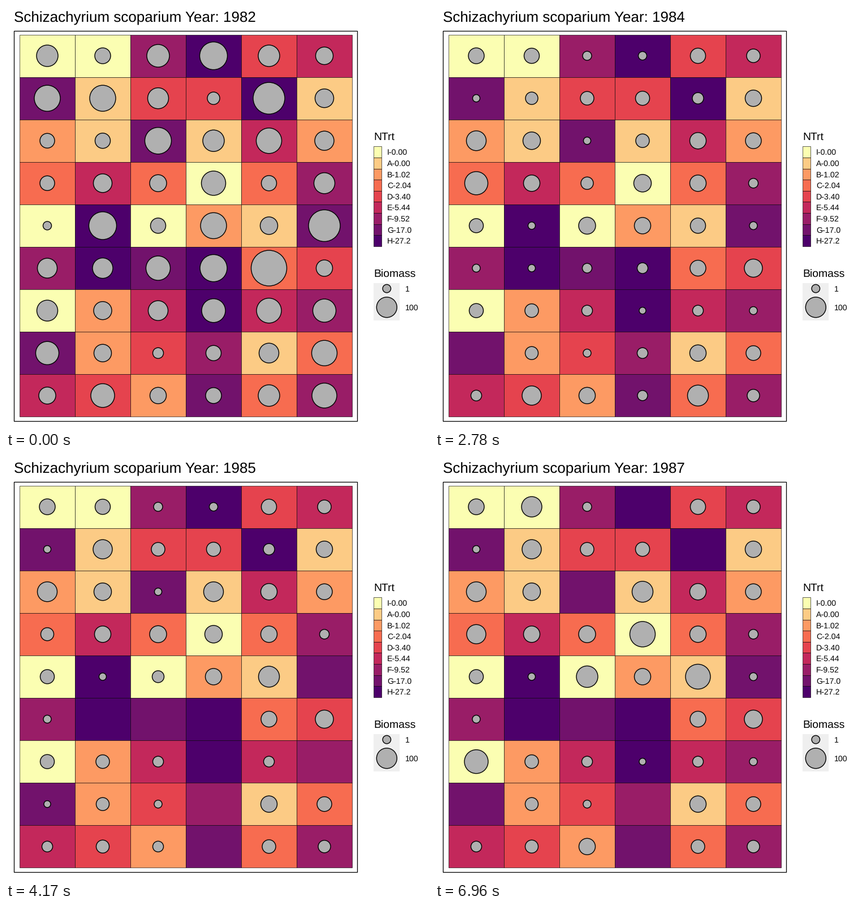
Write a matplotlib script that moves like this. It is 748 by 748 pixels and loops after 8 s.

```python
import numpy as np
import matplotlib.pyplot as plt
from matplotlib.animation import FuncAnimation
from matplotlib.collections import EllipseCollection
from matplotlib.patches import Rectangle

SIZE, DPI = 748, 100
STEP, LOOP = 20, 8000
PX = 72 / DPI  # points per pixel

LEFT, TOP, CELL_W, CELL_H = 24, 50.5, 98, 75.1
ROWS, COLS = 9, 6
GREY = "#B0B0B0"

TREATMENTS = {
    "I-0.00": "#FBFEB2", "A-0.00": "#FCCB85", "B-1.02": "#FD9A63",
    "C-2.04": "#F76C50", "D-3.40": "#E5434E", "E-5.44": "#C3285B",
    "F-9.52": "#991D67", "G-17.0": "#72126C", "H-27.2": "#4D006B",
}
COLOURS = {label[0]: colour for label, colour in TREATMENTS.items()}
FIELD = ["IIFHDE", "GADDHA", "BAGAEB", "CECICF", "IHIBAG",
         "FHGHCD", "IBEHEF", "GBDFAC", "EDBGCF"]

YEARS = range(1982, 1988)
STARTS = [0, 1390, 2780, 4170, 5570, 6960]

# Circle diameters: first season, and the level each plot settles at.
FIRST = np.array([
    [39, 29, 41, 50, 39, 32],
    [47, 47, 38, 23, 57, 34],
    [27, 28, 48, 39, 46, 35],
    [27, 34, 31, 44, 28, 38],
    [16, 50, 28, 47, 32, 57],
    [36, 37, 44, 49, 64, 30],
    [38, 33, 36, 43, 45, 42],
    [42, 32, 20, 28, 36, 46],
    [31, 43, 30, 29, 39, 45],
], float)
SETTLED = np.array([
    [29, 28, 17, 16, 28, 25],
    [14, 35, 25, 26, 21, 30],
    [36, 32, 14, 25, 30, 29],
    [35, 30, 31, 32, 30, 18],
    [26, 14, 39, 30, 28, 15],
    [15, 14, 18, 20, 29, 33],
    [26, 25, 20, 13, 20, 15],
    [13, 24, 15, 20, 30, 27],
    [20, 24, 30, 19, 25, 23],
], float)

# Plots that stray from the general course (column letter, row number).
OUTLIERS = {
    1983: dict(B1=39, D1=38, A2=24, B2=45, C2=42, D2=39, A3=42, B3=42,
               C3=20, D3=42, E3=49, A4=39, A5=34, B5=24, F5=28, D6=27,
               E6=36, F6=40, D7=17, F7=18, A8=14, E8=39, E9=45),
    1984: dict(A4=42, B2=23, C4=23, E9=38, B9=35, C5=31),
    1985: dict(A4=24, C5=22, D3=36, E5=38, C9=20),
    1986: dict(C5=44, A7=38, E3=20),
    1987: dict(D4=46, A7=43, E5=45, D3=38, B1=37),
}
EMPTY = {
    1984: "A8",
    1985: "F5 B6 C6 D6 D7 F7 D8 D9",
    1986: "D1 A2 C3 B5 B6 D7 A8 C8 D9",
    1987: "D1 E2 C3 B6 C6 D6 A8 D8 D9",
}


def plot_index(name):
    return int(name[1]) - 1, "ABCDEF".index(name[0])


def diameters(year):
    weight = {1982: 1, 1983: 0.5}.get(year, 0)
    size = weight * FIRST + (1 - weight) * SETTLED
    for name, value in OUTLIERS.get(year, {}).items():
        size[plot_index(name)] = value
    for name in EMPTY.get(year, "").split():
        size[plot_index(name)] = 0
    return size.ravel()


plt.rcParams["font.family"] = "Liberation Sans"
plt.rcParams["text.hinting"] = "none"

fig = plt.figure(figsize=(SIZE / DPI, SIZE / DPI), dpi=DPI, facecolor="white")
ax = fig.add_axes([0, 0, 1, 1])
ax.set(xlim=(0, SIZE), ylim=(SIZE, 0))
ax.axis("off")


def box(x, y, w, h, fill, line=0.0):
    ax.add_patch(Rectangle((x, y), w, h, facecolor=fill, linewidth=line * PX,
                           edgecolor="black" if line else "none"))


def label(x, y, text, size):
    return ax.text(x, y, text, fontsize=size * PX, color="black",
                   va="baseline", ha="left")


def circles(centres, sizes):
    keep = np.asarray(sizes) > 0
    sizes = np.asarray(sizes, float)[keep] - 1
    group = EllipseCollection(
        sizes, sizes, np.zeros(len(sizes)), units="xy",
        offsets=np.asarray(centres)[keep], offset_transform=ax.transData,
        facecolors=GREY, edgecolors="black", linewidths=1.4 * PX, zorder=3)
    return ax.add_collection(group, autolim=False)


# Field
box(14.5, 43.5, 607, 690, "white", 1.3)
for row, line in enumerate(FIELD):
    for col, letter in enumerate(line):
        box(LEFT + col * CELL_W, TOP + row * CELL_H, CELL_W, CELL_H,
            COLOURS[letter], 0.6)

# Legends
label(650, 237, "NTrt", 19.4)
for i, (name, colour) in enumerate(TREATMENTS.items()):
    box(650.5, 248.3 + 19.6 * i, 14, 19.6, colour, 0.6)
    label(674, 263.2 + 19.6 * i, name, 14.1)

label(650, 479, "Biomass", 19.4)
box(650, 490, 46.5, 66, "#EFEFEF")
circles([(673.3, 499.7), (673.3, 532.8)], [15.5, 37])
label(706, 504.8, "1", 14.1)
label(706, 538, "100", 14.1)

title = label(14, 28.3, "", 26)
centres = [(LEFT + (col + 0.5) * CELL_W, TOP + (row + 0.5) * CELL_H)
           for row in range(ROWS) for col in range(COLS)]
seasons = [circles(centres, diameters(year)) for year in YEARS]


def update(frame):
    now = frame * STEP + STEP / 2
    current = int(np.searchsorted(STARTS, now, side="right")) - 1
    for i, season in enumerate(seasons):
        season.set_visible(i == current)
    title.set_text(f"Schizachyrium scoparium Year: {YEARS[current]}")
    return [title, *seasons]


anim = FuncAnimation(fig, update, frames=LOOP // STEP, interval=STEP,
                     repeat=True, repeat_delay=0, blit=False)
plt.show()
```
